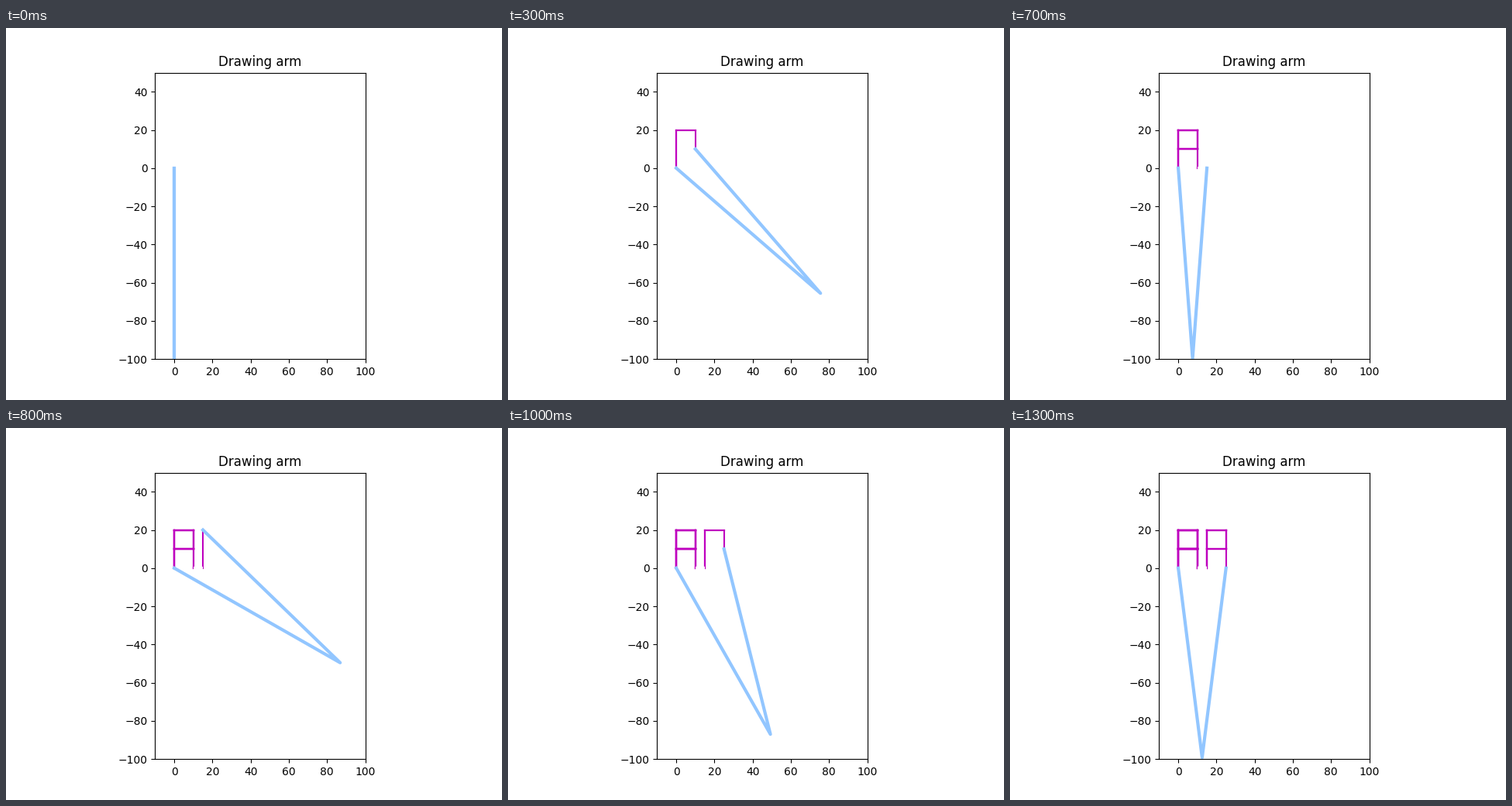
These frames come from a looping animation (640 by 480 pixels, 1.4 s). A matplotlib script:

```python
import numpy as np
import matplotlib.pyplot as plt
from matplotlib.animation import FuncAnimation

ARM = 100
LETTER = [(0, 0), (0, 20), (10, 20), (10, 10), (0, 10), (10, 10), (10, 0)]
STOPS = np.array(LETTER + [(x + 15, y) for x, y in LETTER], dtype=float)
PEN_UP = len(LETTER)

fig, ax = plt.subplots(figsize=(6.4, 4.8), dpi=100)
ax.set_aspect("equal")
ax.set_xlim(-10, 100)
ax.set_ylim(-100, 50)
ax.set_xticks(range(0, 101, 20))
ax.set_yticks(range(-100, 41, 20))
ax.set_title("Drawing arm")


def elbow(tip):
    """Joint of two equal links reaching from the origin to the tip."""
    reach = np.hypot(*tip)
    if reach == 0:
        return np.array([0.0, -ARM])
    normal = np.array([tip[1], -tip[0]]) / reach
    return tip / 2 + normal * np.sqrt(ARM**2 - (reach / 2) ** 2)


def stroke(k):
    """Segment ending at stop k; the pen-up move is wiped in white."""
    (x0, y0), (x1, y1) = STOPS[k - 1], STOPS[k]
    if k == PEN_UP:
        style = dict(color="w", lw=3, solid_capstyle="butt", zorder=2.5)
    else:
        style = dict(color="m", lw=1.5, zorder=2)
    return ax.plot([x0, x1], [y0, y1], **style)[0]


# Every step inks the whole trail again, so older strokes grow heavier.
passes = [[stroke(k) for k in range(1, step + 1)] for step in range(1, len(STOPS))]
arm, = ax.plot([], [], color="#92C6FF", lw=3, zorder=3)


def update(frame):
    for step, strokes in enumerate(passes, 1):
        for line in strokes:
            line.set_visible(step <= frame)
    tip = STOPS[frame]
    arm.set_data(*np.array([(0, 0), elbow(tip), tip]).T)
    return [arm]


anim = FuncAnimation(fig, update, frames=len(STOPS), interval=100, repeat=True)
plt.show()
```
